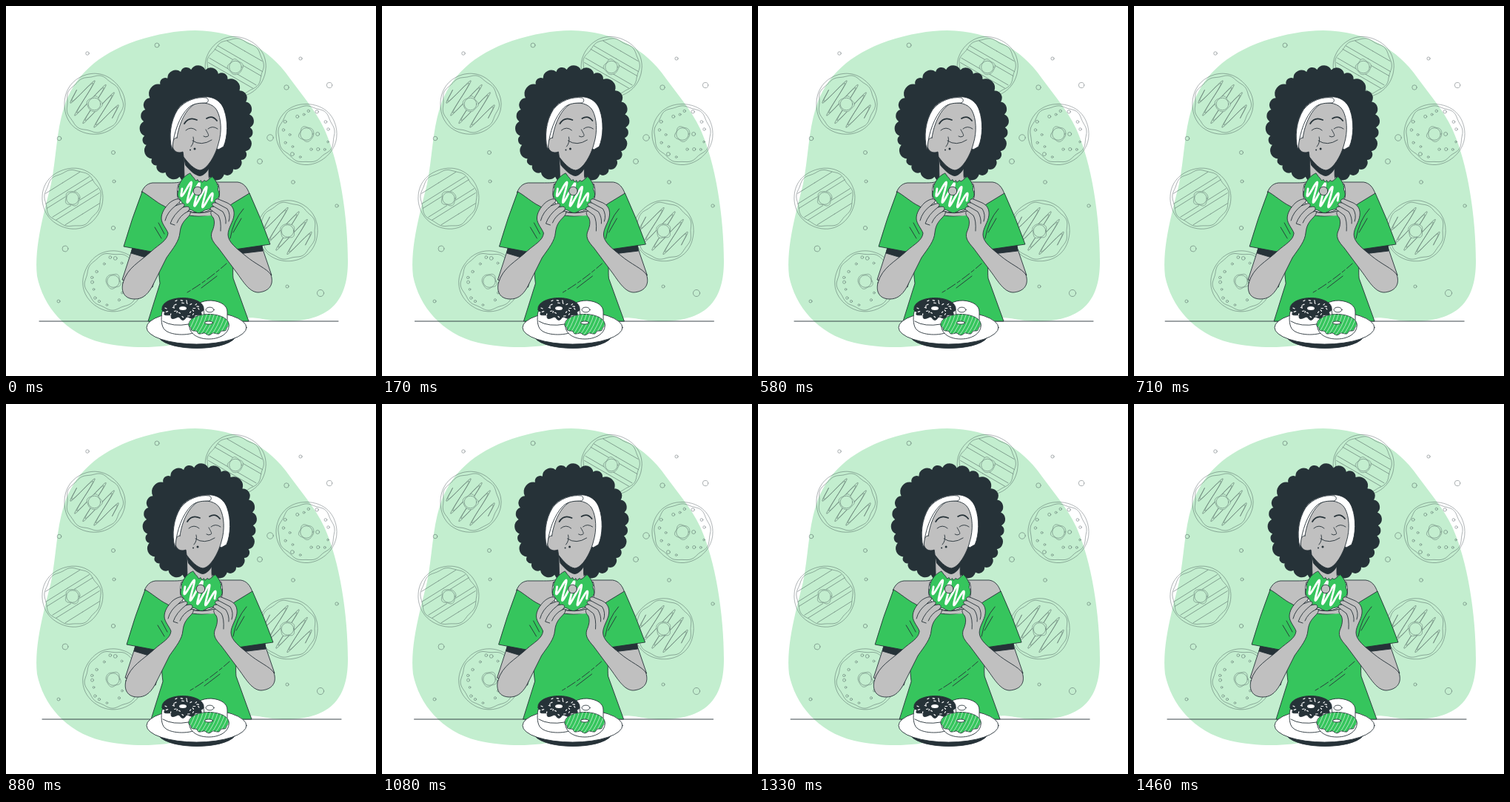
An HTML page for the animation above (1.5 s loop, 500 by 500 pixels).

```html
<!DOCTYPE html>
<html lang="en">
<head>
<meta charset="utf-8">
<title>Donut break</title>
<style>
html, body { margin: 0; width: 100%; height: 100%; overflow: hidden; background: #fff; }
svg { display: block; width: 100vw; height: 100vh; }
.ink, .icing, .faint { stroke: #263238; stroke-width: .9; stroke-linecap: round; stroke-linejoin: round; }
.line, .icing, .faint { fill: none; }
.skin { fill: #c0c0c0; }
.green { fill: #36c55d; }
.white { fill: #fff; }
.dark { fill: #263238; }
.faint { stroke-width: .65; opacity: .58; }
.hole { fill: #c3eecf; }
.brow { stroke-width: 1.8; }
.icing { stroke: #fff; stroke-width: 1.2; }
</style>
</head>
<body>
<svg viewBox="0 0 500 500" xmlns="http://www.w3.org/2000/svg">
  <path class="hole" d="M256 33C314 34 356 58 383 97C402 123 417 139 430 166C451 212 462 285 462 345C462 394 442 426 378 426C350 426 340 419 322 422C290 428 270 447 240 455C210 462 170 464 130 455C80 443 50 405 42 365C37 325 54 270 61 240C68 205 68 170 78 138C91 95 124 65 176 47C205 38 230 33 256 33Z"/>
  <g id="back" class="faint"></g>

  <g id="person">
    <path class="ink line" d="M45 426H449"/>
    <path id="hair" class="dark"/>

    <!-- neck, shoulders, chest -->
    <path class="ink skin" d="M240 194L241 233C240 239 230 239 220 239L198 239C190 240 186 245 183 252L220 290H292L329 254C326 245 321 239 313 238L285 238C277 238 274 235 274 228V205Z"/>
    <path class="dark" d="M240 204L242 215C249 223 255 229 262 230C268 229 273 223 275 218L279 208Z"/>

    <!-- head -->
    <path class="ink white" d="M224 194C220 177 221 160 229 144C236 130 250 124 265 123C279 121 291 128 295 141C300 155 300 176 294 190L287 194L240 170Z"/>
    <path class="ink skin" d="M231 178C234 158 243 139 256 132C267 129 280 132 285 141C291 152 292 170 287 186C283 202 272 221 262 222C254 221 246 212 240 204L239 197C232 200 225 196 225 188C225 182 227 178 231 178Z"/>
    <path class="ink white" d="M225 190C227 171 234 150 246 138C253 131 263 131 271 131C274 129 274 126 271 124C258 122 241 128 232 140C222 156 220 176 224 193Z"/>
    <path class="ink line" d="M243 168Q250 162 257 168M273 166Q279 161 286 166M270 167C272 171 275 175 273 176Q270 178 267 176M252 182Q264 190 278 181M253 177Q255 184 250 190"/>
    <path class="ink line brow" d="M241 159Q247 149 258 154M271 152Q279 147 285 155"/>
    <circle class="dark" cx="249" cy="194.5" r="1"/>
    <circle class="dark" cx="255" cy="193" r="1.5"/>

    <!-- upper arms -->
    <path class="ink skin" d="M171 327L157 370L198 380L210 335ZM345 323L359 364L322 372L312 330Z"/>
    <path class="ink dark" d="M171 326L169 334L189 340L198 333ZM312 328L346 323L347 331L314 335Z"/>

    <!-- shirt -->
    <path class="ink green" d="M184 251C192 255 204 266 213 270C228 280 245 284 260 284C278 284 296 275 306 267L329 253Q345 288 357 322L309 329C307 346 306 358 307 368L328 426H192L208 375C206 359 206 347 207 334L159 325Q170 287 184 251Z"/>
    <path class="skin" d="M230 272C240 281 274 282 290 271L284 282C270 285 246 283 236 280Z"/>
    <path class="ink line" d="M246 278Q262 282 278 277M201 299L210 314M206 293L214 308M321 274Q307 290 303 314M318 287L307 306M208 332L207 350M264 381L285 365"/>
    <path class="ink line" stroke-dasharray="5 3 13 3" d="M245 387Q272 371 298 348"/>

    <!-- donut in hands -->
    <g transform="translate(260 251)">
      <path class="ink white" d="M-27 -10C-33 12 -22 28 0 28C22 28 33 12 27 -10Z"/>
      <path id="bitten" class="ink green"/>
      <path id="drizzle" class="icing" style="stroke-width:2.8" transform="translate(-2 4) rotate(22)"/>
      <circle class="ink skin" cx="-1" cy="-1" r="5.8"/>
    </g>

    <!-- forearms and hands -->
    <path class="ink skin" d="M158 374C164 353 181 346 197 331C207 322 218 317 219 307C217 301 210 294 210 287C210 279 215 272 221 266C226 262 233 259 235 262C237 265 231 267 229 270L237 267C242 266 242 270 239 272L244 271C249 271 249 275 245 278L248 277C251 279 248 283 245 286C239 292 236 297 235 306C234 318 226 327 217 340L197 380C190 392 183 396 174 396C160 396 155 386 158 374Z"/>
    <path class="ink line" d="M229 270Q218 278 215 290M239 272Q226 282 222 294L228 296M245 278Q235 283 231 293"/>
    <path class="ink skin" d="M358 363C353 355 337 349 323 337C312 328 300 319 300 309C300 300 307 292 308 283C309 274 305 269 299 266L287 261C282 260 281 264 284 266C278 265 277 269 281 271C275 271 275 275 279 277C275 278 277 283 280 286C283 292 281 299 278 306C276 314 280 319 287 327L313 362C322 375 330 387 341 387C354 386 363 378 358 363Z"/>
    <path class="ink line" d="M284 266L299 274Q304 282 301 291M281 271L293 278Q298 286 297 294M279 277L287 283Q291 290 290 304"/>
  </g>

  <!-- plate -->
  <path class="ink dark" d="M207 449C222 467 294 467 309 449Z"/>
  <ellipse class="ink white" cx="257.5" cy="434.500" rx="67.500" ry="22.500"/>
  <path class="ink white" d="M256 410C256 403 264 398 277 398C291 399 299 405 299 413V425H262Z"/>
  <ellipse class="ink white" cx="275.500" cy="410.500" rx="5.500" ry="3.400"/>
  <path class="ink white" d="M211 413C209 423 210 434 215 438C224 446 251 446 261 438C268 431 269 420 267 411Z"/>
  <path class="ink line" d="M212 426Q225 434 247 430"/>
  <g transform="translate(239 408.500)">
    <path id="choc" class="ink dark"/>
    <path id="sprinkles" class="icing"/>
    <ellipse class="white" rx="5" ry="2.500"/>
  </g>
  <path class="ink white" d="M248 430C246 440 256 450 274 450C292 450 303 440 301 430Z"/>
  <g transform="translate(274 430)">
    <path id="lime" class="ink green"/>
    <clipPath id="cut"><use href="#lime"/></clipPath>
    <path id="stripes" class="icing" style="stroke-width:.6" clip-path="url(#cut)"/>
    <ellipse class="ink white" cy="-2" rx="5.500" ry="2"/>
  </g>
</svg>
<script>
const { PI, sin, cos, sqrt, min, max, hypot } = Math;
const $ = id => document.getElementById(id);
const shape = (id, d) => $(id).setAttribute('d', d);
const ring = (x, y, r) => `<circle cx="${x}" cy="${y}" r="${r}"/>`;
const path = (d, extra = '') => `<path d="${d}" ${extra}/>`;
const range = (n, f) => Array.from({ length: n }, (_, i) => f(i));

let seed = 7;
const rand = () => (seed = seed * 16807 % 2147483647) / 2147483647;

// Closed outline whose radius depends on the angle, squashed by k
const polar = (radius, k = 1) => 'M' + range(120, i => {
  const a = i * PI / 60, r = radius(a);
  return (r * cos(a)).toFixed(1) + ' ' + (r * sin(a) * k).toFixed(1);
}).join('L') + 'Z';

const wavy = (r, amp, waves, turn) =>
  polar(a => r + amp * (sin(waves * a + turn) + .6 * sin(5 * a + turn * 2)));

// Icing line swinging across a disc of radius r
const zigzag = (r, turns, fill) => 'M' + range(91, i => {
  const x = r * (i / 45 - 1) * .9;
  return x.toFixed(1) + ' ' + (fill * sqrt(r * r - x * x) * sin(i / 45 * turns * PI)).toFixed(1);
}).join('L');

const drizzled = path(zigzag(34, 4, .9) + zigzag(34, 4, .75), 'transform="rotate(38)"');

const banded = angle => path([-25, -13, -7, 7, 13, 25].map(y => {
  const w = sqrt(37 * 37 - y * y), gap = sqrt(max(0, 100 - y * y));
  return `M${-w} ${y}H${-gap}M${gap} ${y}H${w}`;
}).join(''), `transform="rotate(${angle})"`);

const dotted = () => range(18, i => {
  const r = 15 + 19 * sqrt(rand());
  return ring(r * cos(i * 2.4), r * sin(i * 2.4), 1.3 + 1.4 * rand() ** 2);
}).join('');

const donut = (x, y, turn, topping) => `<g transform="translate(${x} ${y})">` +
  path(wavy(41, .35, 3, turn)) + path(wavy(37.8, .9, 9, turn)) + topping +
  path(wavy(9.8, .7, 4, turn), 'class="hole"') + ring(0, 0, 8.3) + '</g>';

// Bubbles, from small to large
const bubbles = [[71, 399], [146, 237], [380, 379], [398, 71], [447, 270], [110, 64], [388, 238], [145, 198],
  [145, 300], [72, 179], [204, 53], [379, 110], [343, 210], [437, 107], [80, 328], [357, 178], [425, 388]];

$('back').innerHTML = donut(119.5, 132.5, 1, drizzled) + donut(310, 82.5, 2, banded(30)) +
  donut(406, 173, 3, dotted()) + donut(90, 260, 4, banded(-32)) +
  donut(380.5, 304, 5, drizzled) + donut(145, 372, 6, dotted()) +
  bubbles.map(([x, y], i) => ring(x, y, 2 + i * i / 100)).join('');

// Hair: arcs between uneven notches on an oval with a squarer lower half
const CURLS = 26;
const notches = range(CURLS, i => {
  const a = (i + .35 * rand()) / CURLS * 2 * PI, c = cos(a), s = sin(a);
  const x = s > 0 ? Math.sign(c) * Math.abs(c) ** .6 : c;
  return [258 + 72 * x, 158.5 + 73 * s];
});
shape('hair', 'M' + notches[0] + notches.map(([x, y], i) => {
  const [u, v] = notches[(i + 1) % CURLS], r = hypot(u - x, v - y) * .56;
  return `A${r} ${r} 0 0 1 ${u} ${v}`;
}).join('') + 'Z');

// Held donut: a round bite limits the radius near the top
shape('bitten', polar(a => {
  const near = 5 * cos(a) - 31 * sin(a);
  const deep = near * near - 5 * 5 - 31 * 31 + 17 * 17;
  const rim = 27.5 + (sin(a) > -.2 ? sin(a * 9) : 0);
  return near > 0 && deep > 0 ? min(rim, near - sqrt(deep) + 1.3 * sin(a * 22)) : rim;
}));
shape('drizzle', zigzag(24, 4, .65));

const glaze = (r, drip) => a => r + (sin(a) > 0 ? drip * sin(a) * sin(a * 13) : 0);
shape('choc', polar(glaze(28, 4), .5));
shape('lime', polar(glaze(27, 2.5), .5));
shape('sprinkles', range(24, i => {
  const a = i * 2.4, r = i % 2 ? 22 : 14;
  return `M${r * cos(a)} ${r * sin(a) / 2}l${2.6 * cos(i * 1.7)} ${1.6 * sin(i * 1.7)}`;
}).join(''));
shape('stripes', range(14, i => `M${i * 5 - 42} 15q9 -10 15 -30`).join(''));

// Sideways shake: ten equal linear legs, drawn at 24 steps a second
const LOOP = 1500, STEPS = 36;
const shake = [0, -1, 2, -4, 4, -4, 4, -4, 2, -1, 0];

function draw(t) {
  const step = min(STEPS - 1, Math.floor((t % LOOP + 4) * STEPS / LOOP));
  const p = step / (STEPS - 1) * 10;
  const i = min(9, Math.floor(p));
  const x = shake[i] + (shake[i + 1] - shake[i]) * (p - i);
  $('person').setAttribute('transform', `translate(${x.toFixed(2)} 0)`);
}

let start;
function tick(now) {
  start ??= now;
  draw(now - start);
  requestAnimationFrame(tick);
}
draw(0);
requestAnimationFrame(tick);
</script>
</body>
</html>
```
